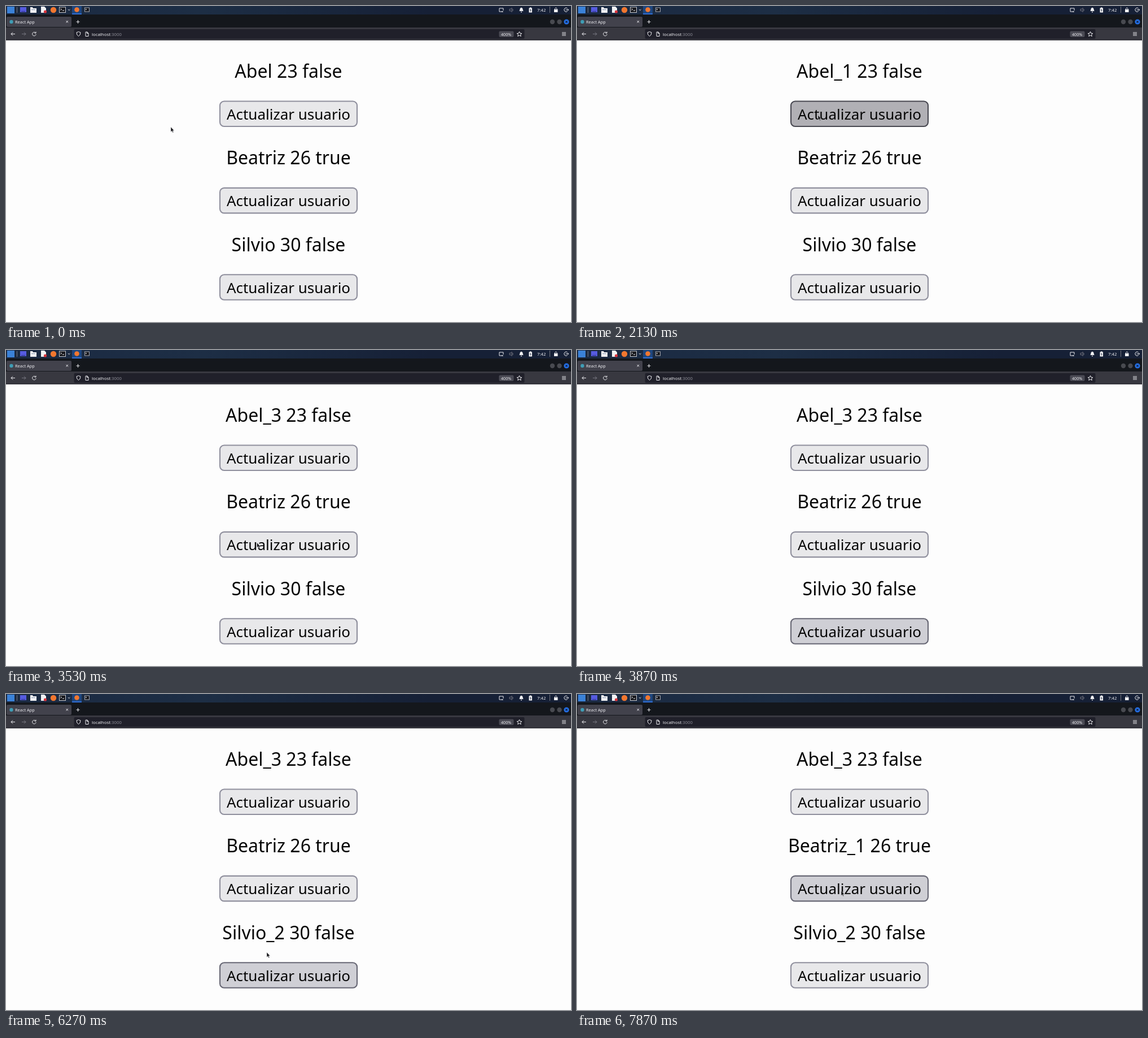
Recreate the animation shown at these times as an HTML page. Size 1001x559 px, loop 8 s.

```html
<!DOCTYPE html>
<html lang="es">
<head>
<meta charset="utf-8">
<title>React App</title>
<style>
  html, body { margin: 0; width: 100%; height: 100%; overflow: hidden; background: #fdfdfd; }
  svg { display: block; width: 1001px; height: 559px; font-family: "Noto Sans", sans-serif; }
  .line { fill: none; stroke: #ececf0; stroke-width: 1; }
  .dim { stroke: #777781; }
  .ui { font-size: 7.8px; fill: #ececf0; }
  .user, .label { text-anchor: middle; fill: #050505; }
  .user { font-size: 32px; }
  .label { font-size: 26px; }
  .button rect { fill: #e8e8ea; stroke: #8f8f9d; stroke-width: 2.1; }
  .hover rect { fill: #cfcfd5; stroke: #676774; }
  .active rect { fill: #b1b0b5; stroke: #484851; }
</style>
</head>
<body>
<svg viewBox="0 0 1001 559">
  <linearGradient id="panel">
    <stop offset="0" stop-color="#1b2a42"/>
    <stop offset=".35" stop-color="#1d2e45"/>
    <stop offset=".75" stop-color="#162036"/>
  </linearGradient>
  <rect width="1001" height="559" fill="#fdfdfd"/>

  <!-- desktop panel -->
  <rect width="1001" height="15" fill="url(#panel)"/>
  <rect x="2" y="1" width="13" height="12" fill="#3b82d8"/>
  <path class="line dim" d="M19.500 2v10M963.500 1v11"/>
  <rect x="25" y="2" width="11" height="9" fill="#565be0"/>
  <path d="M27 9.500h7" stroke="#2b2f88"/>
  <path d="M43 2h4l1 2h6v8h-11z" fill="#f2f2f4"/>
  <path d="M45 6.500h7" stroke="#8b9bb5"/>
  <path d="M62 1h6l3 3v8h-9z" fill="#f2f2f4"/>
  <circle cx="69.500" cy="10" r="2.600" fill="#d9343c"/>
  <circle cx="84" cy="7" r="5.200" fill="#f2772f"/>
  <rect x="94.500" y="2" width="11" height="9.500" fill="#17181d" stroke="#c9cbd0"/>
  <path class="line" d="M96.500 4.500l2 1.500-2 1.500M100 8h3"/>
  <path class="line" d="M110 6l1.700 1.700L113.400 6"/>
  <rect x="117" width="17" height="15" fill="#1f477f"/>
  <path d="M117 14h17" stroke="#367bf0" stroke-width="1.500"/>
  <circle cx="125.500" cy="6.500" r="4.300" fill="#f2772f"/>
  <rect x="139.500" y="3" width="8" height="7" fill="#17181d" stroke="#a9abb2"/>
  <path class="line" d="M141 5l1.500 1-1.500 1"/>
  <path class="line" d="M880 10h-6V4h7v4M878 10h3"/>
  <path class="line dim" d="M892 5.500h2l2-2v7l-2-2h-2zM897.500 5q1.500 2 0 4"/>
  <path d="M909 9q1.500-1 1.500-4 2.500-4.500 5 0 0 3 1.500 4zM912 10h2v1.300h-2z" fill="#f4f4f6"/>
  <path d="M926.500 3.500h1.500v-1h2.500v1h1.500v8h-5.500z" fill="#f4f4f6"/>
  <path d="M929.500 5l-1 2.500h1.600l-1 2.500" fill="none" stroke="#162036" stroke-width=".8"/>
  <text class="ui" x="941" y="9.800">7:42</text>
  <rect x="971" y="6" width="6.500" height="5" fill="#f4f4f6"/>
  <path class="line" d="M972.500 6V4.500q1.700-3 3.500 0V6"/>
  <path class="line" d="M994.500 4a3.500 3.500 0 1 0 0 5.500M991.500 6.800h5m-1.500-1.700l1.700 1.700-1.700 1.700"/>

  <!-- tab strip -->
  <rect y="15" width="1001" height="23" fill="#14171c"/>
  <rect x="1" y="19" width="115" height="18" rx="2" fill="#42424c"/>
  <circle cx="9.500" cy="28" r="3.200" fill="#3f9db5"/>
  <text class="ui" x="16" y="30.800" style="font-size:7.4px">React App</text>
  <path class="line" d="M106.500 26l3.500 3.500m0-3.500l-3.500 3.500M124.500 28h6M127.500 25v6"/>
  <g fill="#484a50"><circle cx="968" cy="28" r="4.200"/><circle cx="980.500" cy="28" r="4.200"/></g>
  <circle cx="993" cy="28" r="4.600" fill="#246fe6"/>
  <path d="M991.300 26.300l3.400 3.400m0-3.400l-3.400 3.400" stroke="#0d1b38" stroke-width="1.200"/>

  <!-- toolbar -->
  <rect y="38" width="1001" height="22.500" fill="#383840"/>
  <path d="M0 60h1001" stroke="#191920"/>
  <rect x="120.500" y="41" width="798" height="17" rx="2" fill="#20202a"/>
  <path class="line" d="M16 49.500H9m3-3l-3 3 3 3"/>
  <path class="line dim" d="M28 49.500h7m-3-3l3 3-3 3"/>
  <path class="line" d="M52.500 47.500a3.300 3.300 0 1 0 .7 2.500M53 45.500v2.500h-2.500"/>
  <path class="line" d="M128.500 45.500l3.500 1.300q0 5-3.500 6.700-3.500-1.700-3.500-6.700z"/>
  <path class="line" d="M141 46h3l2 2v5.500h-5zM143.500 46v2.500h2.500"/>
  <text class="ui" x="152" y="52.500">localhost<tspan fill="#8c8c96">:3000</tspan></text>
  <rect x="873.500" y="44.500" width="26" height="10.500" rx="2" fill="#4a4a54"/>
  <text class="ui" x="877" y="52.500" style="font-size:7.2px">400%</text>
  <path class="line" d="M909.500 45.300l1.300 2.900 3.100.3-2.400 2 .8 3.100-2.800-1.700-2.800 1.700.8-3.100-2.400-2 3.100-.3z"/>
  <path class="line" d="M985 47h7M985 49.500h7M985 52h7"/>

  <g id="page"></g>
  <path id="cursor" d="M0 0v8.600l2-1.700 1.400 3 1.300-.6-1.400-2.900h2.500z" fill="#151518" stroke="#e4e4e8" stroke-width=".5"/>
</svg>
<script>
const LOOP = 8000, STEP = LOOP / 120, ROW_HEIGHT = 153.4;
const users = [["Abel", "23 false"], ["Beatriz", "26 true"], ["Silvio", "30 false"]];
// [time, x, y] of the pointer tip
const path = [
  [0, 292, 214], [733, 292, 214], [1333, 427, 193], [3333, 427, 193],
  [3733, 462, 488], [4133, 462, 496], [6200, 462, 496], [6266, 462, 457],
  [7000, 468, 348], [LOOP, 468, 348]
];
// [press, release, row]
const clicks = [
  [1466, 1600, 0], [2066, 2200, 0], [2800, 2930, 0],
  [4266, 4466, 2], [5330, 5460, 2], [7266, 7466, 1]
];

const page = document.getElementById("page");
const cursor = document.getElementById("cursor");
page.innerHTML = users.map((_, i) => `
  <g transform="translate(0 ${i * ROW_HEIGHT})">
    <text class="user" x="500.5" y="127"></text>
    <g class="button">
      <rect x="379" y="168.500" width="243" height="44.500" rx="7.500"/>
      <text class="label" x="500.500" y="201">Actualizar usuario</text>
    </g>
  </g>`).join("");
const names = page.querySelectorAll(".user");
const buttons = page.querySelectorAll(".button");

function pointerAt(t) {
  const i = Math.max(1, path.findIndex(key => key[0] >= t));
  const [t0, x0, y0] = path[i - 1], [t1, x1, y1] = path[i];
  const k = Math.max(0, (t - t0) / (t1 - t0));
  return [x0 + (x1 - x0) * k, y0 + (y1 - y0) * k];
}

function isOver([x, y], row) {
  const top = 167.5 + row * ROW_HEIGHT;
  return x > 378 && x < 623 && y > top && y < top + 46.5;
}

function draw(t) {
  const tick = Math.floor((t + 4) / STEP) * STEP;
  const hoverPoint = pointerAt(tick - STEP); // hover trails the pointer by one step
  cursor.setAttribute("transform", `translate(${pointerAt(tick)})`);
  users.forEach(([name, details], row) => {
    const own = clicks.filter(click => click[2] === row);
    const count = own.filter(click => t >= click[1]).length;
    const pressed = own.some(([down, up]) => t >= down && t < up);
    names[row].textContent = `${name}${count ? "_" + count : ""} ${details}`;
    buttons[row].setAttribute("class",
      "button" + (pressed ? " active" : isOver(hoverPoint, row) ? " hover" : ""));
  });
}

const start = performance.now();
function frame() {
  draw((performance.now() - start) % LOOP);
  requestAnimationFrame(frame);
}
frame();
</script>
</body>
</html>
```
